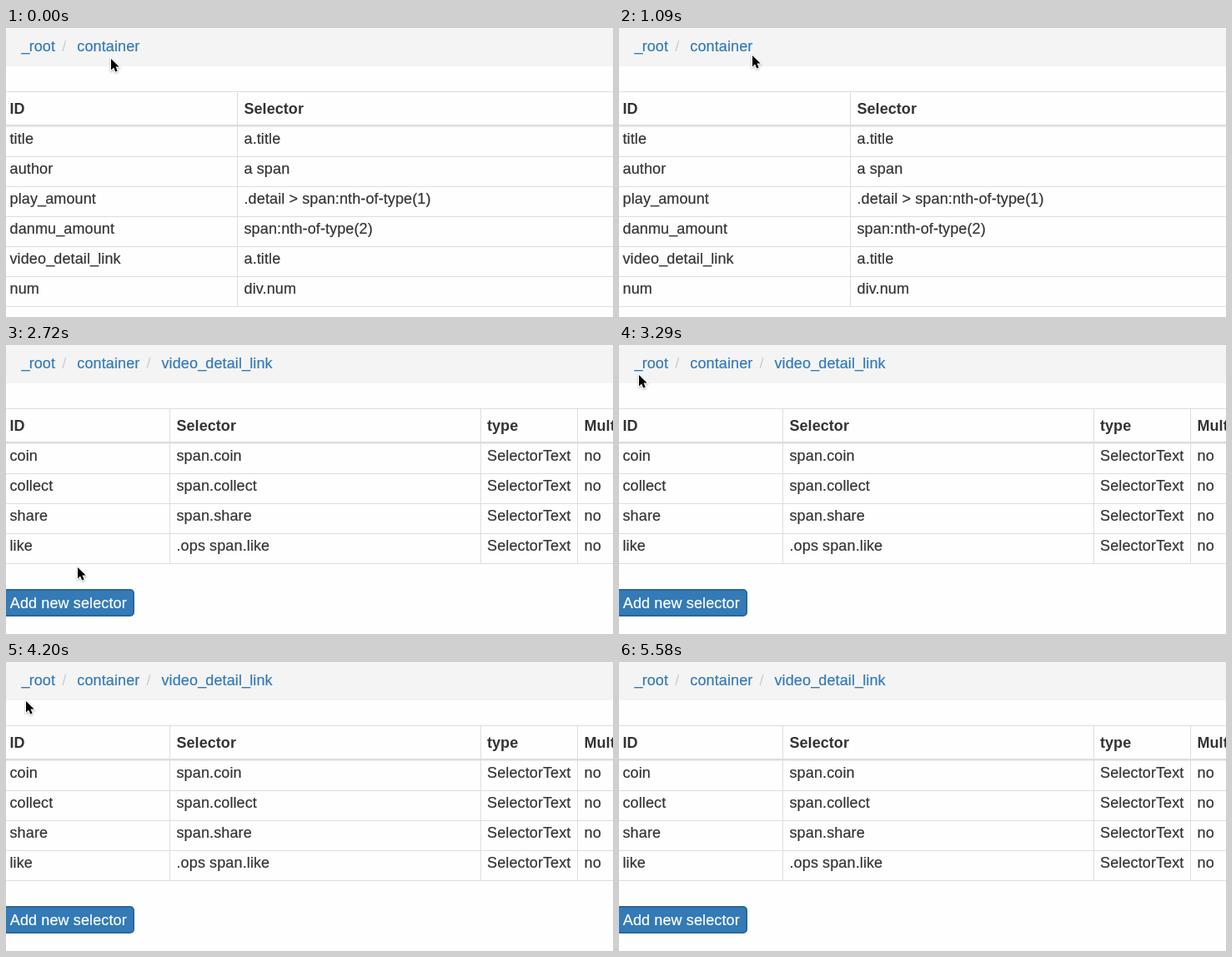
These frames come from a looping animation (728x347 px, 6.81 s). An HTML page:

```html
<!DOCTYPE html>
<html lang="en">
<head>
<meta charset="utf-8">
<title>Selector tree</title>
<style>
  html, body { margin: 0; width: 100%; height: 100%; overflow: hidden; background: #fefefe; }
  svg { display: block; width: 728px; height: 347px; font: 18px "Liberation Sans", Arial, sans-serif; color: #333; }
  text { fill: currentColor; stroke: currentColor; stroke-width: .2px; letter-spacing: .12px; }
  .under { letter-spacing: -.9px; baseline-shift: 1px; }
  .head { font-weight: bold; stroke: none; letter-spacing: .05px; }
  .link { color: #337ab7; }
  .slash { color: #ccc; stroke: none; }
  .label { color: #fff; }
  .line { fill: #ddd; }
  .row { fill: none; }
  .row.on { fill: #f3f3f3; }
  .pointer { filter: drop-shadow(0 1px 1px rgba(0, 0, 0, .3)); }
</style>
</head>
<body>
<svg id="stage" viewBox="0 0 728 347"></svg>
<script>
const LOOP = 6810, SWITCH = 2190, TICK = 57;
const TOP = 118, ROW = 36;

const pages = [
  {
    crumbs: [["_root", 18.5], ["container", 85.3]],
    cols: [4.5, 285.5],
    head: ["ID", "Selector"],
    rows: [
      ["title", "a.title"],
      ["author", "a span"],
      ["play_amount", ".detail > span:nth-of-type(1)"],
      ["danmu_amount", "span:nth-of-type(2)"],
      ["video_detail_link", "a.title"],
      ["num", "div.num"]
    ],
    clickable: 4
  },
  {
    crumbs: [["_root", 18.5], ["container", 85.3], ["video_detail_link", 186.5]],
    cols: [4.5, 204.5, 577, 693.5],
    head: ["ID", "Selector", "type", "Multiple"],
    rows: ["coin", "collect", "share", "like"].map(id =>
      [id, (id === "like" ? ".ops span." : "span.") + id, "SelectorText", "no"]),
    button: "Add new selector"
  }
];

const markup = s => s.replace(/>/g, "&gt;").replace(/_/g, '<tspan class="under">_</tspan>');
const text = (s, x, y, cls = "") => `<text x="${x}" y="${y}" class="${cls}">${markup(s)}</text>`;
const rect = (x, y, w, h, cls) =>
  `<rect x="${x}" y="${y}" width="${w}" height="${h}" class="${cls}"/>`;

function drawPage(p) {
  const bottom = TOP + p.rows.length * ROW;
  let s = '<rect width="728" height="46" fill="#f4f4f4"/>';
  p.crumbs.forEach(([name, x], i) => {
    if (i) s += text("/", x - 18, 28, "slash");
    s += text(name, x, 28, "link");
  });
  p.rows.forEach((cells, i) => {
    const y = TOP + i * ROW;
    s += rect(0, y, 728, ROW, "row") + rect(0, y + ROW, 728, 1, "line");
    cells.forEach((c, k) => s += text(c, p.cols[k], y + 21));
  });
  s += rect(0, 76, 728, 1, "line") + rect(0, TOP - 2, 728, 2.5, "line");
  p.cols.slice(1).forEach(x => s += rect(Math.floor(x) - 8, 76, 1, bottom - 76, "line"));
  p.head.forEach((h, k) => s += text(h, p.cols[k], 103, "head"));
  if (p.button) {
    s += '<rect x="-9" y="294" width="162" height="31" rx="4" fill="#337ab7" stroke="#2b669a" stroke-width="2"/>';
    s += text(p.button, 4.8, 316, "label");
  }
  return `<g>${s}</g>`;
}

const arrow = '<path d="M0 0V13.4L3.1 10.5 5.3 15.5 7.7 14.5 5.5 9.6H9.6Z" stroke="#fff" stroke-width="2" paint-order="stroke"/>';
const hand = '<g fill="#fff" stroke="#000" stroke-width="1.1" stroke-linejoin="round">' +
  '<path d="M-1.7 10V2C-1.7 .1 1.2 .1 1.2 2V6.3C1.5 5.2 3.7 5.3 3.8 7 4.3 6 6.2 6.2 6.3 7.7 7 7 8.4 7.4 8.4 9V12C8.4 14 7 14.5 6.8 17H-.8C-1 14.9-3 13.6-4.2 11.5L-5.6 9.3C-6.3 7.9-4.5 7-3.3 8.2Z"/>' +
  '<path d="M1.2 6V9M3.8 7V9.5M6.3 8V9.8M1 12V15M3 12V15M5 12V15" fill="none" stroke-width=".8"/></g>';

// Each move passes its points at even intervals and eases between them
const moves = [
  { from: 0, to: 0, via: [[126, 37]] },
  { from: 60, to: 690, via: [[118, 38], [4, 44], [178, 48], [110, 40]] },
  { from: 750, to: 1430, via: [[100, 41], [20, 44], [160, 33], [125, 120], [92, 219]] },
  { from: 1480, to: 1770, via: [[91, 228], [87, 277]] },
  { from: 2720, to: 3350, via: [[86, 267], [40, 100], [23, 36], [24, 36]] },
  { from: 3410, to: 4090, via: [[26, 36], [282, 55], [25, 50]] },
  { from: 4140, to: 4780, via: [[24, 47], [25, 48], [285, 52], [78, 46]] },
  { from: 4830, to: 5120, via: [[84, 46], [340, 48]] },
  { from: 5290, to: 5580, via: [[350, 58], [460, 190], [602, 329], [620, 365]] }
];

function pointerAt(t) {
  const { from, to, via } = moves.filter(m => m.from <= t).pop();
  const steps = Math.round((to - from) / TICK) || 1;
  const step = (to - from) / steps || 1;
  // The pointer holds still between ticks
  const tick = Math.min(steps, Math.floor((t - from + 5) / step));
  const pos = tick / steps * (via.length - 1);
  const i = Math.floor(pos), u = pos - i;
  const a = via[i], b = via[i + 1] || a;
  const e = u * u * (3 - 2 * u);
  return a.map((v, k) => Math.round(v + (b[k] - v) * e));
}

const stage = document.getElementById("stage");
stage.innerHTML = pages.map(drawPage).join("") +
  [arrow, hand].map(shape => `<g class="pointer">${shape}</g>`).join("");
const [first, second, arrowEl, handEl] = stage.children;
const views = [first, second].map(el => ({ el, rows: el.querySelectorAll(".row") }));
const show = (el, on) => el.style.display = on ? "" : "none";

function render(now) {
  const t = now % LOOP;
  const active = t < SWITCH ? 0 : 1;
  const [x, y] = pointerAt(t);
  const hover = y > TOP ? Math.floor((y - TOP) / ROW) : -1;
  const pointing = hover === pages[active].clickable;

  views.forEach((v, i) => {
    show(v.el, i === active);
    v.rows.forEach((r, k) => r.classList.toggle("on", k === hover));
  });
  show(arrowEl, !pointing);
  show(handEl, pointing);
  for (const el of [arrowEl, handEl]) el.setAttribute("transform", `translate(${x} ${y})`);
}

const start = performance.now();
function loop() {
  render(performance.now() - start);
  requestAnimationFrame(loop);
}
loop();
</script>
</body>
</html>
```
